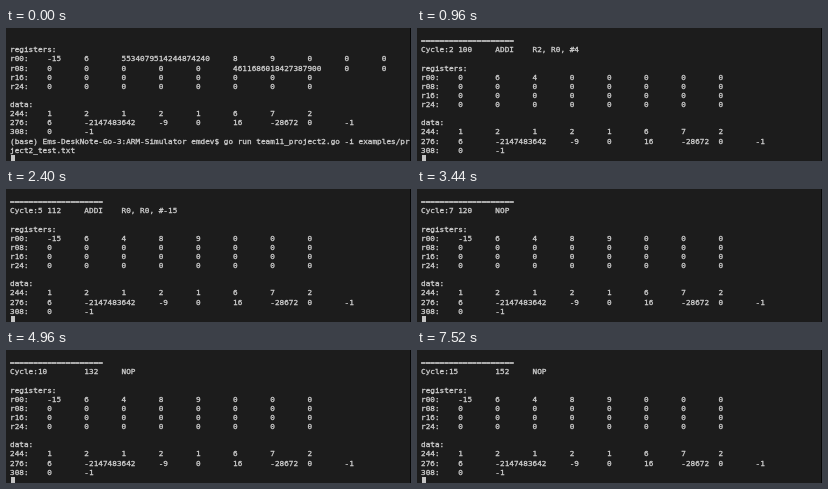
These frames come from a looping animation (405 by 133 pixels, 8000 ms). An HTML page:

```html
<!DOCTYPE html>
<html lang="en">
<head>
<meta charset="utf-8">
<title>Pipeline simulator run</title>
<style>
  html, body {
    margin: 0;
    width: 100%;
    height: 100%;
    overflow: hidden;
    background: #1c1c1c;
  }
  #stage {
    position: relative;
    box-sizing: border-box;
    width: 100%;
    height: 100%;
    overflow: hidden;
    contain: strict;
    border-right: 1px solid #060606;
  }
  /* Laid out at ten times the size so that the small glyphs keep fractional advances. */
  #screen {
    position: absolute;
    left: 4.4px;
    top: 7.5px;
    margin: 0;
    font: 77.2px/91.2px "DejaVu Sans Mono", monospace;
    font-variant-ligatures: none;
    white-space: pre;
    tab-size: 8;
    color: #cfcfcf;
    -webkit-text-stroke: 3px #cfcfcf;
    transform: scale(.1);
    transform-origin: 0 0;
  }
  #cursor {
    position: absolute;
    left: 4.5px;
    top: 127px;
    width: 4.6px;
    height: 6px;
    background: #c4c4c4;
  }
</style>
</head>
<body>
<div id="stage">
  <pre id="screen"></pre>
  <div id="cursor"></div>
</div>
<script>
  const LOOP = 8000, CYCLES = 15, STEP = 480, PAUSE = 80;
  const pausedSteps = [5, 7, 11, 14];

  // ADDI instructions: target register, source register, constant
  const program = [[1, 2, 6], [2, 0, 4], [3, 2, 4], [4, 1, 3], [0, 0, -15]];
  const zeros = Array(8).fill(0);

  const row = (label, values) => [label + ":", ...values].join("\t");

  function registersAfter(cycle) {
    const regs = [...zeros];
    for (const [to, from, add] of program.slice(0, cycle)) regs[to] = regs[from] + add;
    return regs;
  }

  function dump(r00, r08) {
    return [
      "registers:",
      row("r00", r00),
      row("r08", r08),
      row("r16", zeros),
      row("r24", zeros),
      "",
      "data:",
      row("244", "12121672"),
      row("276", [6, 1 - 2 ** 31 + 5, -9, 0, 16, -28672, 0, -1]),
      row("308", [0, -1])
    ];
  }

  function promptScreen() {
    const r00 = registersAfter(CYCLES).slice(0, 5);
    r00[2] = "5534079514244874240";
    const r08 = [...zeros];
    r08[5] = "4611686018427387900";
    return [
      "",
      ...dump([...r00, 0, 0, 0], r08),
      "(base) Ems-DeskNote-Go-3:ARM-Simulator emdev$ go run team11_project2.go -i examples/pr",
      "ject2_test.txt"
    ];
  }

  function cycleScreen(n) {
    const op = program[n - 1];
    const text = op ? `ADDI\tR${op[0]}, R${op[1]}, #${op[2]}` : "NOP";
    return [
      "=".repeat(20),
      `Cycle:${n}\t${92 + 4 * n}\t${text}`,
      "",
      ...dump(registersAfter(n), zeros)
    ];
  }

  const startOf = n => n * STEP + PAUSE * pausedSteps.filter(p => p < n).length;

  const screen = document.getElementById("screen");
  let shown = -1;

  function draw() {
    const t = performance.now() % LOOP;
    let step = CYCLES;
    while (startOf(step) > t) step--;
    if (step !== shown) {
      shown = step;
      screen.textContent = (step ? cycleScreen(step) : promptScreen()).join("\n");
    }
    requestAnimationFrame(draw);
  }
  draw();
</script>
</body>
</html>
```
